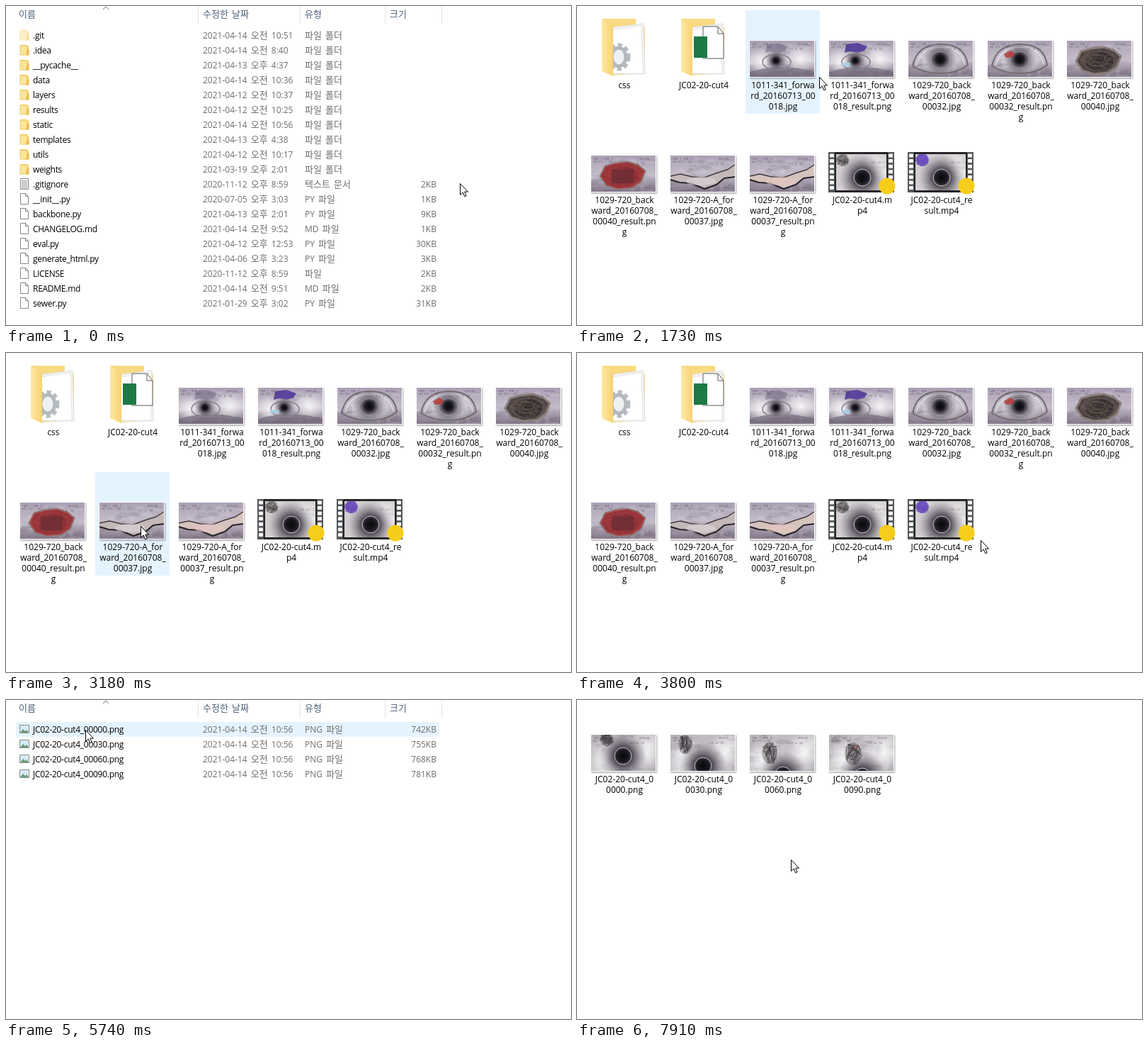
Write an HTML page that moves like this. It is 798 px wide and 450 px high and loops after 7.99 s.

```html
<!DOCTYPE html>
<html lang="ko">
<head>
<meta charset="utf-8">
<title>File browser</title>
<style>
html, body { margin: 0; width: 100%; height: 100%; overflow: hidden; background: #fff; }
svg { display: block; }
#stage { width: 798px; height: 450px; }
text { font: 12px "Open Sans", "Noto Sans CJK KR", "Noto Sans CJK", sans-serif; word-spacing: 2px; }
.k { font-family: "Noto Sans CJK KR", "Noto Sans CJK", sans-serif; font-size: 13px; }
.name { letter-spacing: -.28px; }
.head { fill: #4c607a; }
.info { fill: #6d6d6d; }
.mid { text-anchor: middle; }
.end { text-anchor: end; }
.tiny { font-size: 3.5px; fill: #453f50; opacity: .75; }
</style>
</head>
<body>
<svg id="stage" viewBox="0 0 798 450" xmlns="http://www.w3.org/2000/svg">
  <defs>
    <linearGradient id="wall" x2="0" y2="1">
      <stop offset="0" stop-color="#aaa0b4"/><stop offset=".5" stop-color="#c3bbc8"/><stop offset="1" stop-color="#83788a"/>
    </linearGradient>
    <linearGradient id="gray" x2="1" y2="1">
      <stop offset="0" stop-color="#b4b0b5"/><stop offset=".6" stop-color="#c9c5ca"/><stop offset="1" stop-color="#a7a2aa"/>
    </linearGradient>
    <radialGradient id="hole">
      <stop offset="0" stop-color="#08070c"/><stop offset=".25" stop-color="#1d1a22"/>
      <stop offset=".42" stop-color="#4e4954" stop-opacity=".9"/><stop offset="1" stop-color="#8c8690" stop-opacity="0"/>
    </radialGradient>
    <radialGradient id="glow">
      <stop offset="0" stop-color="#fff" stop-opacity=".85"/><stop offset="1" stop-color="#fff" stop-opacity="0"/>
    </radialGradient>
    <linearGradient id="flap" x2="1"><stop offset="0" stop-color="#ffe9a6"/><stop offset="1" stop-color="#f7d272"/></linearGradient>
    <filter id="shade" x="-10%" y="-10%" width="125%" height="130%">
      <feDropShadow dx="1" dy="1.5" stdDeviation="1" flood-opacity=".35"/>
    </filter>
  </defs>
  <rect width="798" height="450" fill="#fff"/>
  <rect id="mark"/>
  <g id="views"></g>
  <circle id="press" r="12" fill="#e2e21c" fill-opacity=".68"/>
  <path id="cursor" d="M.5.5V16.5L4.2 13L6.8 18.8L9.2 17.7L6.7 12.1H11.5Z" fill="#fff" stroke="#000"/>
</svg>
<script>
const LOOP = 7990;
const $ = id => document.getElementById(id);

function random(seed) {
  return () => (seed = (seed * 16807) % 2147483647) / 2147483647;
}

function text(x, y, s, cls = '') {
  const body = s.replace(/[가-힣]+/g, '<tspan class="k">$&</tspan>');
  return `<text x="${x}" y="${y}" class="${cls}">${body}</text>`;
}
const rect = (x, y, w, h, more) => `<rect x="${x}" y="${y}" width="${w}" height="${h}" ${more}/>`;
const oval = (x, y, rx, ry, more) => `<ellipse cx="${x}" cy="${y}" rx="${rx}" ry="${ry}" ${more}/>`;
const path = (d, more) => `<path d="${d}" ${more}/>`;
const line = (d, color, w) => path(d, `fill="none" stroke="${color}" stroke-width="${w}"`);

// ---- detail lists ----
const ICONS = {
  folder: path('M6 3h10l1 2h1v12H6z', 'fill="#f3cc62"') + path('M6 4h10v13H6z', 'fill="#ffe59b" stroke="#ecc75f"')
    + path('M16 9h2.5v8.5H14z', 'fill="#e9bd4b"'),
  page: path('M6.5 2.5h7l4 4v11h-11z', 'fill="#fff" stroke="#858585"') + line('M13.5 2.5v4h4', '#858585', 1),
  text: path('M6.5 2.5h11v15h-11z', 'fill="#fff" stroke="#858585"') + line('M8 5.5h8M8 7.5h8M8 9.5h8M8 11.5h8M8 13.5h8M8 15.5h8', '#999', 1),
  image: path('M5.5 4.5h13v11h-13z', 'fill="#d6eaf7" stroke="#8c8c8c"') + path('M6 15l4-5 3 3 2-2 3 4z', 'fill="#6b9d74"')
};

function row(i, [name, date, type, size, icon]) {
  const y = 31 + 21 * i, base = y + 15;
  return `<g transform="translate(14 ${y})" ${name === '.git' ? 'opacity=".5"' : ''}>${ICONS[icon]}</g>`
    + text(38, base, name, 'name') + text(278, base, date, 'info')
    + text(422, base, type, 'info') + text(608, base, size, 'info end');
}

function list(files) {
  const cells = files.map((f, i) => [14, 31 + 21 * i, 598, 21]);
  const head = [[18, '이름'], [278, '수정한 날짜'], [422, '유형'], [542, '크기']].map(([x, s]) => text(x, 16, s, 'head')).join('')
    + line('M271.5 0V25M415.5 0V25M535.5 0V25M615.5 0V25', '#e5e5e5', 1) + line('M137 5L141 1L145 5', '#777', 1);
  return { cells, art: head + files.map((f, i) => row(i, f)).join('') };
}

const dir = (name, date) => [name, date, '파일 폴더', '', 'folder'];
const file = (name, date, size, type = 'PY 파일', icon = 'page') => [name, date, type, size + 'KB', icon];

const project = [
  dir('.git', '2021-04-14 오전 10:51'), dir('.idea', '2021-04-14 오전 8:40'),
  dir('__pycache__', '2021-04-13 오후 4:37'), dir('data', '2021-04-14 오전 10:36'),
  dir('layers', '2021-04-12 오전 10:37'), dir('results', '2021-04-12 오전 10:25'),
  dir('static', '2021-04-14 오전 10:56'), dir('templates', '2021-04-13 오후 4:38'),
  dir('utils', '2021-04-12 오전 10:17'), dir('weights', '2021-03-19 오후 2:01'),
  file('.gitignore', '2020-11-12 오후 8:59', 2, '텍스트 문서', 'text'),
  file('__init__.py', '2020-07-05 오후 3:03', 1), file('backbone.py', '2021-04-13 오후 2:01', 9),
  file('CHANGELOG.md', '2021-04-14 오전 9:52', 1, 'MD 파일'), file('eval.py', '2021-04-12 오후 12:53', 30),
  file('generate_html.py', '2021-04-06 오후 3:23', 3), file('LICENSE', '2020-11-12 오후 8:59', 2, '파일'),
  file('README.md', '2021-04-14 오전 9:51', 2, 'MD 파일'), file('sewer.py', '2021-01-29 오후 3:02', 31)
];
const stills = ['00000', '00030', '00060', '00090'];

// ---- pictures ----
function specks(seed, n, w = 91, h = 51) {
  const r = random(seed);
  let out = '';
  for (let i = 0; i < n; i++)
    out += oval(r() * w, r() * h, 2 + r() * 9, 1 + r() * 3, `fill="${r() < .5 ? '#f4eff8' : '#625b6c'}" opacity=".16"`);
  return out;
}

function scribble(seed, x, y, rx, ry, color = '#2b272b') {
  const r = random(seed);
  let d = '';
  for (let i = 0; i < 42; i++) {
    const a = r() * 6.283, q = .35 + .65 * r();
    d += `${i ? 'L' : 'M'}${(x + rx * q * Math.cos(a)).toFixed(1)} ${(y + ry * q * Math.sin(a)).toFixed(1)}`;
  }
  return oval(x, y, rx * .9, ry * .9, `fill="${color}" opacity=".3"`) + line(d, color, .45);
}

const hole = (x, y, r, ring) => oval(x, y, r, r, 'fill="url(#hole)"')
  + (ring ? oval(x, y, ring, ring, 'fill="none" stroke="#d8d4da" stroke-width=".9"') : '');
const captions = text(3, 6, 'CAM 1 LINE 2', 'tiny') + text(3, 10, 'NO 012 / 340', 'tiny')
  + text(68, 6, '00:01:20', 'tiny') + text(54, 13, '12.0 m 1/2', 'tiny');

function photo(x, y, art, base = 'wall', seed = 7) {
  return `<g filter="url(#shade)">${rect(x - 1, y - 1, 93, 53, 'fill="#fff"')}</g>
    <svg x="${x}" y="${y}" width="91" height="51" viewBox="0 0 91 51">${rect(0, 0, 91, 51, `fill="url(#${base})"`)}${specks(seed, 45)}${art}${captions}</svg>`;
}

const blotch = 'M24 5L40 3L54 8L50 14L40 17L30 15L22 17Z';
function forward(done) {
  return oval(16, 30, 22, 20, 'fill="url(#glow)"') + oval(72, 26, 26, 20, 'fill="url(#glow)"')
    + path('M0 44Q45 30 91 44V51H0Z', 'fill="#71677a" opacity=".65"')
    + path(blotch, `fill="${done ? '#513a9a' : '#70667e'}" opacity="${done ? .9 : .55}"`)
    + oval(38, 30, 20, 11, 'fill="none" stroke="#8b8290" stroke-width="1.5"') + hole(37, 28, 15)
    + (done ? rect(18, 31, 12, 5, 'fill="#a5d3ea" opacity=".8"') : '');
}
function backward(done) {
  return oval(45, 27, 34, 22, 'fill="url(#glow)"')
    + line('M6 36Q12 5 46 5T84 34Q70 46 46 46T6 36', '#736b6d', 2) + line('M11 35Q18 9 46 9T79 33', '#e4dfe5', 1.4)
    + hole(45, 26, 24) + oval(45, 27, 14, 12, 'fill="none" stroke="#a59fa9"')
    + (done ? path('M23 19L32 14L38 18L35 23L26 24Z', 'fill="#b83a36" opacity=".85"') : '');
}
function broken(done) {
  const edge = 'M13 29L20 15L34 11L52 9L67 14L76 22L70 37L58 45L38 47L22 42Z';
  return path(edge, 'fill="#4b4142" stroke="#8b7d78" stroke-width="3"') + oval(46, 29, 20, 13, 'fill="#1b171a"')
    + scribble(31, 46, 28, 30, 17, '#75685f')
    + (done ? path(edge, 'fill="#b92e35" opacity=".68"') + rect(29, 19, 31, 20, 'fill="#612d33" opacity=".65"') : '');
}
function crack(done) {
  const top = 'M0 29L14 26L31 30L48 31L64 25L80 20L91 13';
  return path(top + 'V30L76 32L65 41L48 47L29 39L13 38L0 34Z', `fill="${done ? '#d5c3be' : '#c4b9b8'}"`)
    + line(top, '#423a3b', 1.4) + line('M0 34L13 38L29 39L48 47L65 41L76 32L91 30', '#28242a', 2.2)
    + oval(43, 36, 21, 6, `fill="${done ? '#e3c7c0' : '#d9d2d5'}" opacity=".7"`);
}

function video(x, done) {
  let holes = '';
  for (let i = 0; i < 7; i++) for (const dx of [2, 85])
    holes += rect(x + dx, 208.5 + i * 7.6, 6, 5, 'rx="1" fill="#f7f7f7"');
  return rect(x, 206, 93, 57, 'fill="#55585b"') + holes + rect(x + 9, 206, 75, 57, 'fill="#262628"')
    + `<svg x="${x + 11}" y="209" width="71" height="51" viewBox="0 0 71 51">${rect(0, 0, 71, 51, 'fill="#d2cdd0"')}${specks(91, 18, 71)}
      ${oval(58, 24, 25, 28, 'fill="url(#glow)"')}${hole(37, 33, 33, 12)}
      ${scribble(17, 9, 8, 10, 10, done ? '#5632ad' : '#3d3837')}${done ? oval(10, 8, 9, 9, 'fill="#6848bd" opacity=".75"') : ''}
      ${text(49, 13, '120  1/2', 'tiny')}</svg>`
    + oval(x + 83, 254, 11.5, 11.5, 'fill="#f6cd1b"');
}

function bigFolder(x, inside) {
  return `<g transform="translate(${x} 0)">${path('M21 18H69V30H82V95L36 98L21 92Z', 'fill="#f9da83"')}
    ${path('M37 30L80 25L82 96H37Z', 'fill="#f4f4f4" stroke="#dedede"')}${path('M34 34L77 28L79 95H34Z', 'fill="#fff" stroke="#e6e6e6"')}
    ${inside}${path('M21 18L37 29V99L21 92Z', 'fill="url(#flap)"')}</g>`;
}
const gear = oval(45, 72, 14, 17, 'fill="none" stroke="#b7bcc1" stroke-width="5" stroke-dasharray="6 4.2"')
  + oval(45, 72, 10, 13, 'fill="#eef0f1" stroke="#b4b9be" stroke-width="5"');
const sheet = path('M53 29H74L82 39V74H53Z', 'fill="#fff" stroke="#5c5c5c" transform="translate(-1 0)"')
  + line('M73 29V39H81', '#5c5c5c', 1);
const greenSquare = rect(165, 43, 19, 30, 'fill="#1b7a45"');

function label(x, y, lines) {
  return lines.map((s, i) => text(x + 53, y + 110 + 15 * i, s, 'mid')).join('');
}

function icons(items) {
  const cells = [];
  const art = items.map(([name, draw], i) => {
    const x = 14 + 112 * (i % 7), y = 6 + 162 * Math.floor(i / 7), lines = name.split('|');
    cells.push([x, y, 105, 101 + 15 * lines.length]);
    return draw(x, y) + label(x, y, lines);
  }).join('');
  return { cells, art };
}
const shot = (name, art, base, seed) => [name, (x, y) => photo(x + 6, y + 43, art, base, seed)];

const views = {
  list: list(project),
  icons: icons([
    ['css', x => bigFolder(x, gear)],
    ['JC02-20-cut4', x => bigFolder(x, sheet) + greenSquare],
    shot('1011-341_forwa|rd_20160713_00|018.jpg'.replace('forwa|rd', 'forwa|rd'), forward()),
    shot('1011-341_forwa|rd_20160713_00|018_result.png', forward(true)),
    shot('1029-720_back|ward_20160708_|00032.jpg', backward()),
    shot('1029-720_back|ward_20160708_|00032_result.pn|g', backward(true)),
    shot('1029-720_back|ward_20160708_|00040.jpg', broken()),
    shot('1029-720_back|ward_20160708_|00040_result.pn|g', broken(true)),
    shot('1029-720-A_for|ward_20160708_|00037.jpg', crack()),
    shot('1029-720-A_for|ward_20160708_|00037_result.pn|g', crack(true)),
    ['JC02-20-cut4.m|p4', x => video(x + 5)],
    ['JC02-20-cut4_re|sult.mp4', x => video(x + 5, true)]
  ]),
  sub: list(stills.map((n, i) => file(`JC02-20-cut4_${n}.png`, '2021-04-14 오전 10:56', 742 + 13 * i, 'PNG 파일', 'image'))),
  busy: { cells: [], art: text(399, 27, '작업 중...', 'mid info') },
  thumbs: icons(stills.map((n, i) => {
    const [hx, hy, sx, sy, rx, ry] = [[45, 30, 22, 7, 11, 10], [46, 44, 21, 14, 11, 15], [47, 57, 28, 26, 12, 17], [47, 59, 34, 27, 13, 18]][i];
    const art = oval(20, 35, 25, 30, 'fill="url(#glow)"') + oval(78, 25, 24, 30, 'fill="url(#glow)"')
      + hole(hx, hy, 34, 12) + scribble(23 + i, sx, sy, rx, ry)
      + (i === 3 ? line('M33 18L43 16', '#b5473c', 1) : '');
    return shot(`JC02-20-cut4_0|${n.slice(1)}.png`.replace(/\|0*/, m => '|' + n.slice(1, 1 + m.length - 1)), art, 'gray', 40 + i);
  }))
};
$('views').innerHTML = Object.entries(views).map(([k, v]) => `<g id="${k}">${v.art}</g>`).join('');

// ---- motion ----
// start, end, steps, then points as [step, x, y]
const moves = [
  [0, 0, 1, [1, 641, 250]],
  [150, 530, 6, [2, 500, 226], [4, 230, 184], [6, 138, 168]],
  [1340, 2110, 11, [2, 165, 158], [6, 342, 100], [11, 630, 105]],
  [2190, 2960, 11, [1, 695, 112], [2, 728, 128], [4, 560, 185], [6, 358, 210], [11, 60, 240]],
  [3030, 3800, 11, [6, 320, 248], [11, 570, 264]],
  [3880, 4570, 10, [1, 590, 260], [2, 602, 250], [5, 480, 200], [10, 173, 102]],
  [5350, 5740, 6, [6, 112, 42]],
  [6140, 6910, 11, [2, 112, 42], [9, 112, 87], [11, 100, 88]],
  [7060, 7830, 11, [6, 400, 95], [11, 301, 225]],
  [7910, 7910, 1, [1, 302, 225]]
];
const scenes = [[0, 'list'], [930, 'icons'], [4950, 'sub'], [6140, 'busy'], [6220, 'thumbs']];
const presses = [[700, 780], [850, 930], [4720, 4800], [4880, 4950]];
const selections = [[700, 930], [4720, 4950]];

const within = (spans, t) => spans.some(([a, b]) => t >= a && t < b);
const latest = (table, t) => table.findLastIndex(r => r[0] <= t);

function place(t) {
  const i = latest(moves, t);
  const [start, end, steps, ...points] = moves[i];
  const gap = steps > 1 ? (end - start) / (steps - 1) : 1;
  const step = Math.min(steps, Math.floor((t - start) / gap + .3) + 1);
  let from = i ? [0, ...moves[i - 1].at(-1).slice(1)] : [0, 641, 250];
  for (const to of points) {
    if (step <= to[0]) {
      const p = (step - from[0]) / (to[0] - from[0]);
      return [1, 2].map(n => Math.round(from[n] + (to[n] - from[n]) * p));
    }
    from = to;
  }
}

function set(el, attrs) {
  for (const k in attrs) el.setAttribute(k, attrs[k]);
}

function draw(t) {
  const [x, y] = place(t), scene = scenes[latest(scenes, t)][1];
  for (const k in views) $(k).style.display = k === scene ? '' : 'none';
  const cell = views[scene].cells.find(([cx, cy, w, h]) => x >= cx && x < cx + w && y >= cy && y < cy + h);
  $('mark').style.display = cell ? '' : 'none';
  if (cell) {
    const chosen = within(selections, t), [cx, cy, w, h] = cell, inset = chosen ? .5 : 0;
    set($('mark'), {
      x: cx + inset, y: cy + inset, width: w - 2 * inset, height: h - 2 * inset,
      fill: chosen ? '#cce8ff' : '#e5f3ff', stroke: chosen ? '#99d1ff' : 'none'
    });
  }
  set($('press'), { cx: x + 1, cy: y, visibility: within(presses, t) ? 'visible' : 'hidden' });
  set($('cursor'), { transform: `translate(${x} ${y})` });
}

const began = performance.now();
function tick() {
  draw((performance.now() - began) % LOOP);
  requestAnimationFrame(tick);
}
tick();
</script>
</body>
</html>
```
